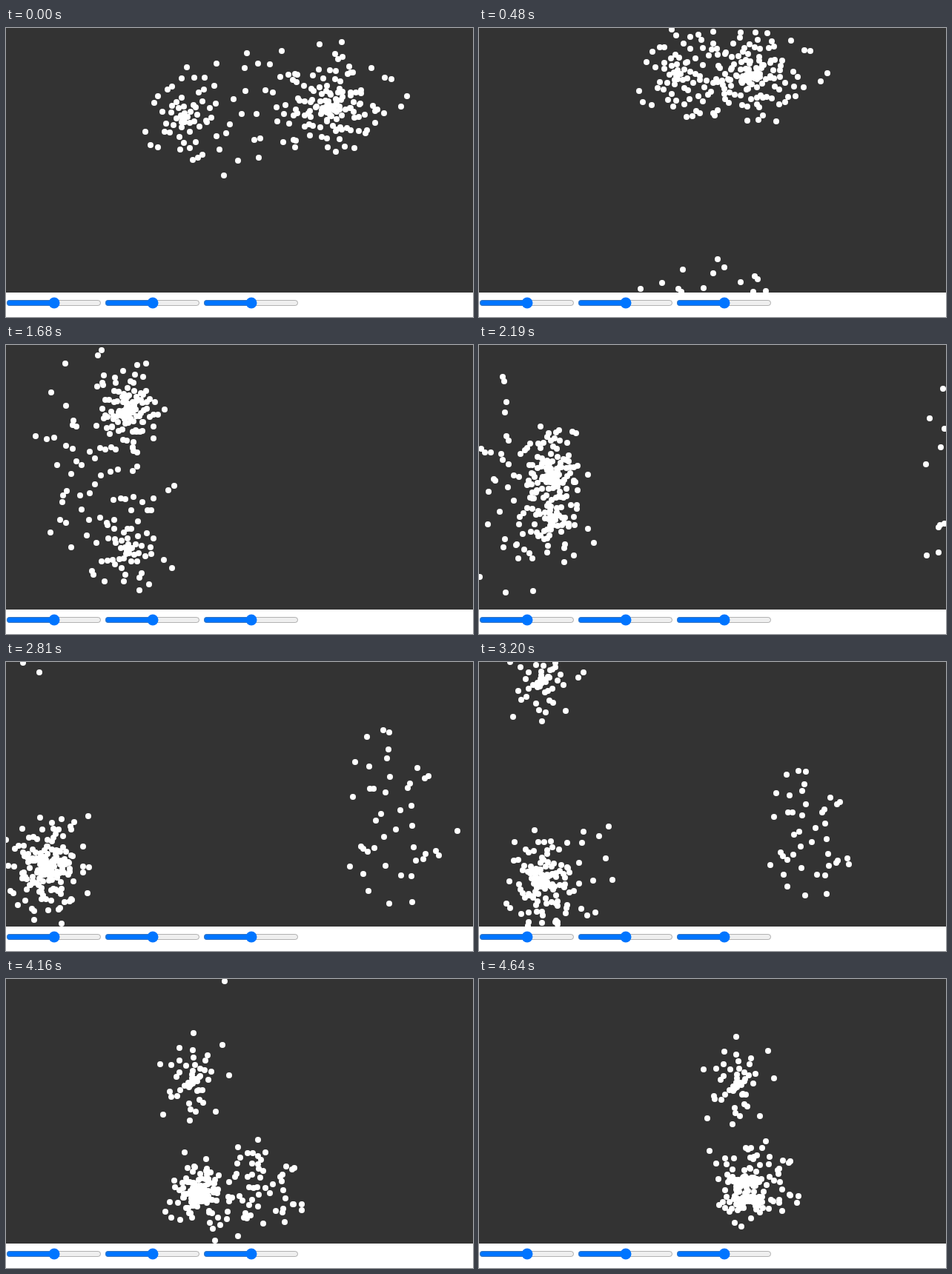
Write an HTML page with a canvas that moves like this. It is 630 px wide and 390 px high and loops after 4740 ms.

```html
<!DOCTYPE html>
<html lang="en">
<head>
<meta charset="utf-8">
<title>Flocking</title>
<style>
  html, body { margin: 0; width: 100%; height: 100%; overflow: hidden; background: #fff; }
  canvas { display: block; }
  input { position: absolute; top: 363px; width: 129px; height: 16px; margin: 0; pointer-events: none; }
</style>
</head>
<body>
<canvas id="sky" width="630" height="357"></canvas>
<input type="range" tabindex="-1" style="left:0">
<input type="range" tabindex="-1" style="left:133px">
<input type="range" tabindex="-1" style="left:266px">
<script>
const W = 630, H = 357, LOOP = 4740, GOLDEN = Math.PI * (3 - Math.sqrt(5));
const ctx = document.getElementById('sky').getContext('2d');

// Uneven holds; every other step lasts 120 ms.
const holds = { 15: 150, 18: 140, 25: 150 };
const starts = [0];
for (let i = 0; i < 38; i++) starts.push(starts[i] + (holds[i] || 120));

// Route of the main flock: time, x, y.
const route = [[0, 437, 107], [960, 292, 36], [1680, 165, 87], [2810, 55, 278], [3680, 165, 290], [4640, 359, 273]];

function slope(i, c) {
  const a = route[Math.max(i - 1, 0)], b = route[Math.min(i + 1, route.length - 1)];
  return (b[c] - a[c]) / (b[0] - a[0]);
}

function along(t, c) {
  let i = 0;
  while (i < route.length - 2 && t > route[i + 1][0]) i++;
  const p = route[i], q = route[i + 1];
  const d = q[0] - p[0], u = (t - p[0]) / d, v = 1 - u;
  return p[c] * (1 + 2 * u) * v * v + q[c] * u * u * (3 - 2 * u) +
    d * u * v * (slope(i, c) * v - slope(i + 1, c) * u);
}

const part = (t, a, b) => Math.min(Math.max((t - a) / (b - a), 0), 1);
const smooth = (t, a, b) => { const u = part(t, a, b); return u * u * (3 - 2 * u); };
const pulse = (t, a, b) => Math.sin(Math.PI * part(t, a, b));
const settle = t => smooth(t, 3680, 4640);

// Each group drifts from the route by (dx, dy) and spreads over (rx, ry).
const groups = [
  { // leaves downwards and wraps to the top
    n: 50, k: 1.2,
    place: t => [-10 * settle(t), 224 * (1 - (1 - part(t, 2810, 4640)) ** 2), 60 - 14 * smooth(t, 960, 1680), 62]
  },
  { // stays on the route, then flattens
    n: 50, k: 1,
    place: t => [0, 0, 64 - 24 * smooth(t, 960, 1680) - 20 * settle(t), 58 - 51 * settle(t)]
  },
  { // loose halo that crosses the left edge and returns from the right
    n: 42, k: 0.5,
    place: t => [
      -50 * smooth(t, 960, 2190) - 560 * smooth(t, 2000, 4800),
      70 * Math.sin(2 * Math.PI * part(t, 960, 3660)) - 14 * (1 - smooth(t, 0, 960)),
      98 - 46 * smooth(t, 960, 3680),
      75 - 28 * smooth(t, 2810, 4640) + 80 * pulse(t, 600, 3400)
    ]
  },
  { // second flock, caught up across the top edge
    n: 52, k: 1.1,
    place: t => [-197 * (1 - smooth(t, 0, 960)), 15 - 372 * part(t, 0, 2400) ** 2 + 26 * settle(t),
      54 - 16 * settle(t), 60 - 46 * settle(t)]
  },
  { // stragglers between the flocks
    n: 26, k: 0.6,
    place: t => [-129 * (1 - smooth(t, 0, 960)) - 45 * pulse(t, 600, 2600) + 60 * pulse(t, 2810, 4640),
      -H * smooth(t, 0, 2400), 78 - 24 * settle(t), 92 - 32 * settle(t)]
  }
];

let seed = 29;
function random() {
  seed = (seed * 16807) % 2147483647;
  return seed / 2147483647;
}

// Golden-angle spacing keeps neighbours apart; a little jitter breaks the spiral.
for (const g of groups) {
  const turn = random() * 2 * Math.PI;
  g.dots = Array.from({ length: g.n }, (_, i) => ({
    r: ((i + random()) / g.n) ** g.k * (0.85 + 0.4 * random()),
    a: turn + i * GOLDEN + random() * 0.5,
    spin: (random() - 0.5) * 0.0003
  }));
}

const wrap = (v, size) => ((v % size) + size) % size;

function draw(t) {
  ctx.fillStyle = '#333';
  ctx.fillRect(0, 0, W, H);
  ctx.fillStyle = '#fff';
  ctx.beginPath();
  const x0 = along(t, 1), y0 = along(t, 2);
  for (const g of groups) {
    const [dx, dy, rx, ry] = g.place(t);
    for (const { r, a, spin } of g.dots) {
      const angle = a + spin * t;
      const x = wrap(Math.round(x0 + dx + Math.cos(angle) * r * rx), W);
      const y = wrap(Math.round(y0 + dy + Math.sin(angle) * r * ry), H);
      ctx.moveTo(x + 4, y);
      ctx.arc(x, y, 4, 0, 2 * Math.PI);
    }
  }
  ctx.fill();
}

const origin = performance.now();
function tick() {
  const t = (performance.now() - origin) % LOOP;
  let i = starts.length - 1;
  while (i > 0 && starts[i] > t) i--;
  draw(starts[i]);
  requestAnimationFrame(tick);
}
tick();
</script>
</body>
</html>
```
